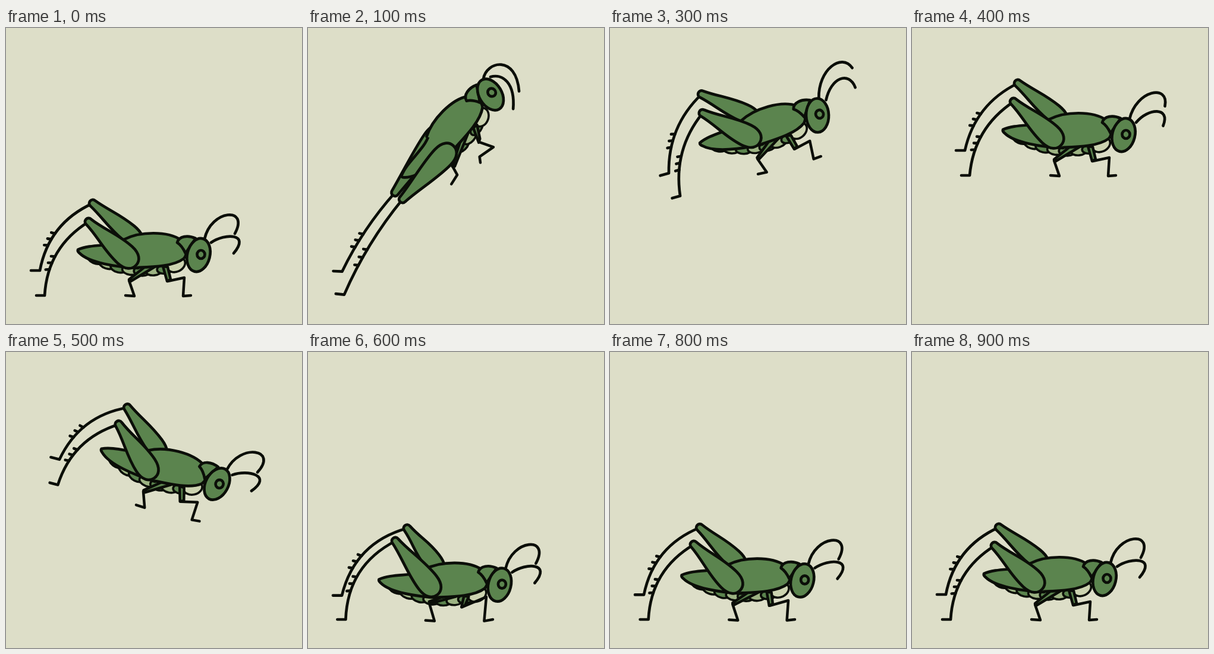
Animation of 498x498 px, one loop 1 s. Source, as an HTML page with a canvas:

```html
<!DOCTYPE html>
<html lang="en">
<head>
<meta charset="utf-8">
<title>Grasshopper</title>
<style>
html, body { margin: 0; width: 100%; height: 100%; overflow: hidden; background: #dddec8; }
canvas { display: block; width: 498px; height: 498px; }
</style>
</head>
<body>
<canvas id="stage" width="498" height="498"></canvas>
<script>
const ctx = document.getElementById('stage').getContext('2d');
const PAPER = '#dddec8', GREEN = '#5b844e', PALE = '#9db383', CREAM = '#ccd3b0', INK = '#0b0e08';
const STEP = 100;

// Limb points in body space; the head sits at HEAD and every pose moves it.
const HEAD = [324, 382];
const stand = {
  far: [146, 295, 57, 408, 42, 408],
  near: [139, 326, 65, 450, 51, 450],
  mid: [207, 425, 216, 451, 201, 450],
  front: [272, 426, 300, 420, 298, 451, 311, 450],
  horn1: [345, 305, 410, 300, 385, 346],
  horn2: [368, 345, 412, 345, 383, 379],
  bend: [0.26]
};
const crouch = {
  ...stand,
  far: [160, 290, 58, 403, 43, 403],
  near: [145, 315, 65, 444, 51, 444],
  mid: [206, 417, 215, 446, 200, 445],
  front: [265, 422, 301, 409, 298, 446, 312, 444],
  bend: [0.28]
};
const stretch = {
  far: [94, 385, -63, 416, -73, 405],
  near: [95, 402, -88, 446, -97, 435],
  mid: [193, 424, 189, 438, 171, 442],
  front: [254, 425, 265, 448, 237, 443, 231, 451],
  horn1: [359, 337, 402, 365, 362, 412],
  horn2: [364, 371, 367, 398, 334, 426],
  bend: [0.07]
};
const glide = {
  ...stand,
  horn1: [346, 308, 392, 291, 402, 321],
  horn2: [363, 327, 395, 324, 398, 354],
  bend: [0.22]
};

function mix(a, b, k) {
  const out = {};
  for (const key in a) out[key] = a[key].map((v, i) => v + (b[key][i] - v) * k);
  return out;
}

const pose = (x, y, tilt, rig) => ({ x, y, tilt, rig });
const land = k => pose(324 - k, 382 + 6 * k, 0, mix(stand, crouch, k));

const poses = [
  land(0),
  pose(307, 112, -45, stretch),
  pose(320, 134, -32, glide),
  pose(349, 147, -15.7, glide),
  pose(356, 180, 0, mix(glide, stand, 0.5)),
  pose(355, 222, 14.4, stand),
  land(1.6),
  land(1),
  land(0.4),
  land(0)
];

function shape(d, fill) {
  const p = new Path2D(d);
  ctx.fillStyle = fill;
  ctx.fill(p);
  ctx.stroke(p);
}

function oval(x, y, rx, ry, turn, fill) {
  ctx.beginPath();
  ctx.ellipse(x, y, rx, ry, turn * Math.PI / 180, 0, Math.PI * 2);
  ctx.fillStyle = fill;
  ctx.fill();
  ctx.stroke();
}

function line(pts) {
  ctx.beginPath();
  for (let i = 0; i < pts.length; i += 2) ctx.lineTo(pts[i], pts[i + 1]);
  ctx.stroke();
}

function shin([kx, ky, ax, ay, tx, ty], bend) {
  const dx = ax - kx, dy = ay - ky;
  const qx = (kx + ax) / 2 - dy * bend, qy = (ky + ay) / 2 + dx * bend;
  ctx.beginPath();
  ctx.moveTo(kx, ky);
  ctx.quadraticCurveTo(qx, qy, ax, ay);
  ctx.lineTo(tx, ty);
  ctx.stroke();
  // Spurs lean a little towards the foot.
  for (const t of [0.55, 0.63, 0.71]) {
    const u = 1 - t;
    const x = u * u * kx + 2 * u * t * qx + t * t * ax;
    const y = u * u * ky + 2 * u * t * qy + t * t * ay;
    const vx = u * (qx - kx) + t * (ax - qx), vy = u * (qy - ky) + t * (ay - qy);
    const s = 6 / Math.hypot(vx, vy);
    line([x, y, x + (vx * 0.4 - vy) * s, y + (vy * 0.4 + vx) * s]);
  }
}

function thigh([kx, ky], hx, hy, w) {
  const len = Math.hypot(hx - kx, hy - ky);
  ctx.save();
  ctx.translate(kx, ky);
  ctx.rotate(Math.atan2(hy - ky, hx - kx));
  shape(`M0 -6C28 -8 ${len - 56} ${-w} ${len - 26} ${-w}
    C${len - 8} ${-w} ${len} -10 ${len} 0C${len} 10 ${len - 8} ${w} ${len - 26} ${w}
    C${len - 56} ${w} 28 8 0 6C-8 6 -8 -6 0 -6Z`, GREEN);
  ctx.restore();
}

function horn(x, y, c) {
  ctx.beginPath();
  ctx.moveTo(x, y);
  ctx.bezierCurveTo(...c);
  ctx.stroke();
}

function belly() {
  for (let i = 0; i < 7; i++) {
    const t = i / 6, u = 1 - t;
    const x = 150 * u * u + 420 * u * t + 268 * t * t;
    const y = 388 * u * u + 836 * u * t + 405 * t * t;
    oval(x, y, 14, 8, 24 - 34 * t, i % 2 ? PALE : GREEN);
  }
  oval(286, 398, 16, 12, -25, CREAM);
}

function draw({ x, y, tilt, rig }) {
  ctx.fillStyle = PAPER;
  ctx.fillRect(0, 0, 498, 498);
  ctx.save();
  ctx.translate(x, y);
  ctx.rotate(tilt * Math.PI / 180);
  ctx.translate(-HEAD[0], -HEAD[1]);
  ctx.strokeStyle = INK;
  ctx.lineWidth = 4.7;
  ctx.lineCap = ctx.lineJoin = 'round';

  shin(rig.far, rig.bend[0]);
  thigh(rig.far, 226, 361, 15);

  ctx.lineWidth = 3.6;
  belly();
  ctx.lineWidth = 4.5;
  const [mx, my] = rig.mid, [fx, fy] = rig.front;
  shape(`M236 400L${mx} ${my - 2}L${mx + 3} ${my + 1}L250 402Z`, GREEN);
  line(rig.mid);
  shape(`M264 401L${fx - 1} ${fy}L${fx + 5} ${fy - 3}L272 402Z`, GREEN);
  line(rig.front);

  // Tail and wing stay open where they join.
  ctx.lineWidth = 4.7;
  shape('M202 357C180 369 145 362 121 373Q120 376 124 379C140 395 185 402 222 404', GREEN);
  shape('M198 356C225 342 272 341 295 357C306 367 306 380 299 388C282 401 248 402 222 403', GREEN);
  shape('M302 379Q296 366 288 361C291 350 306 348 319 354Z', GREEN);

  horn(334, 355, rig.horn1);
  horn(345, 361, rig.horn2);
  oval(HEAD[0], HEAD[1], 19, 28.5, 14, GREEN);
  oval(328, 381, 6.5, 7, 0, GREEN);

  shin(rig.near, rig.bend[0]);
  thigh(rig.near, 219, 399, 18.5);
  ctx.restore();
}

const start = performance.now();
function tick() {
  const t = (performance.now() - start) % (STEP * poses.length);
  draw(poses[Math.floor(t / STEP)]);
  requestAnimationFrame(tick);
}
tick();
</script>
</body>
</html>
```
